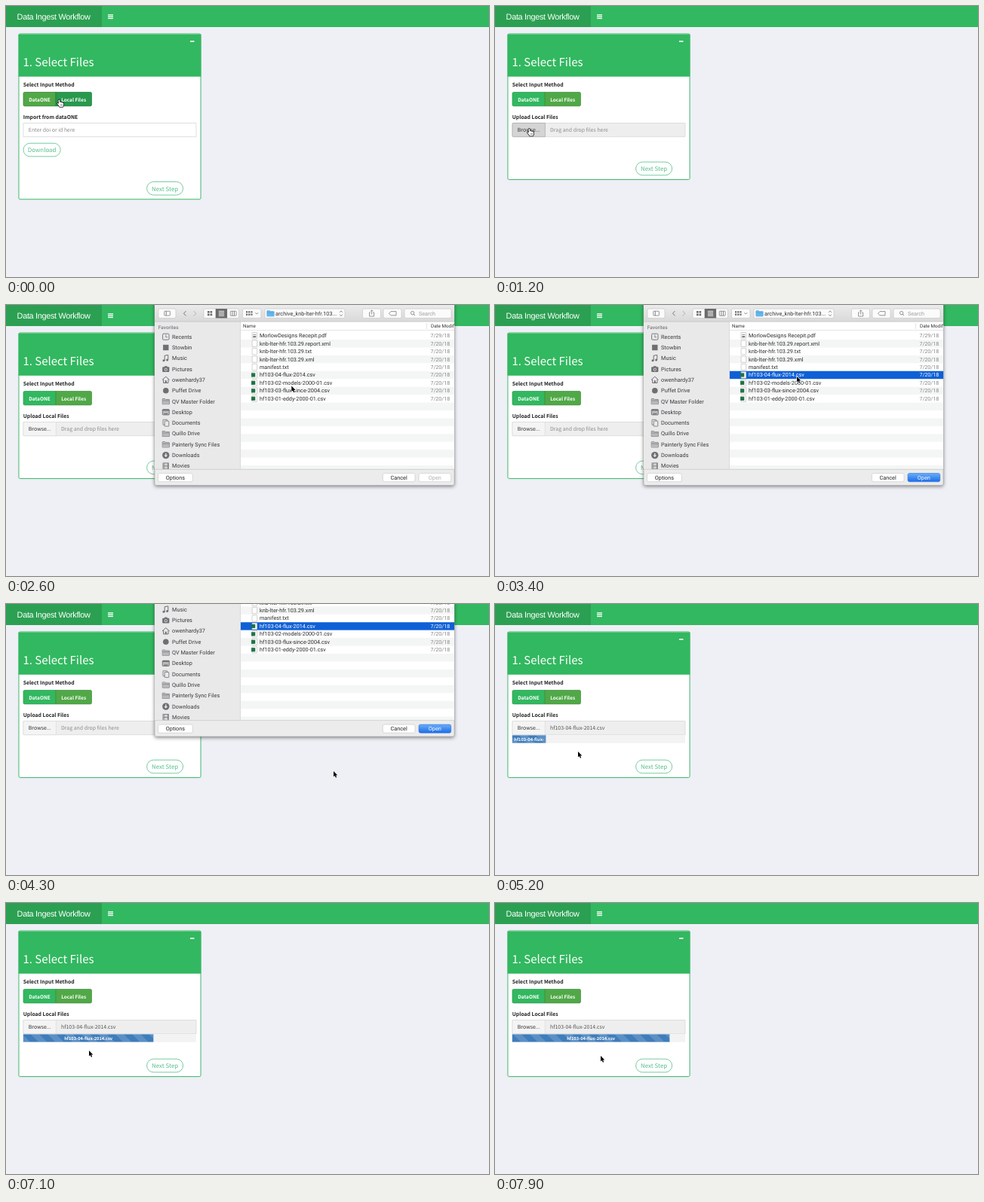
Animation, 640 px wide and 360 px high, one loop 8 s. Source, as an HTML page with a canvas:

```html
<!DOCTYPE html>
<html lang="en">
<head>
<meta charset="utf-8">
<title>Data Ingest Workflow</title>
<style>
html, body { margin: 0; width: 100%; height: 100%; overflow: hidden; background: #eef0f5; }
canvas { display: block; width: 640px; height: 360px; }
</style>
</head>
<body>
<canvas id="stage"></canvas>
<script>
const LOOP = 8000, STEP = 100;
const WEB = '"Noto Sans CJK JP", "Noto Sans CJK SC", "Noto Sans CJK", "Open Sans", sans-serif';
const MAC = 'Roboto, Inter, sans-serif';
const GREEN = '#32b860', TEAL = '#55bf8b';
const FILE = 'hf103-04-flux-2014.csv';

const SIDEBAR = ['Recents', 'Stowbin', 'Music', 'Pictures', 'owenhardy37', 'Puffet Drive',
  'QV Master Folder', 'Desktop', 'Documents', 'Quillo Drive', 'Painterly Sync Files',
  'Downloads', 'Movies'];
const ICONS = ['clock', 'square', 'note', 'camera', 'home', 'circle', 'folder', 'desk', 'pages',
  'folder', 'folder', 'down', 'film'];
const FILES = ['MorlowDesigns Recepit.pdf', 'knb-lter-hfr.103.29.report.xml',
  'knb-lter-hfr.103.29.txt', 'knb-lter-hfr.103.29.xml', 'manifest.txt', FILE,
  'hf103-02-models-2000-01.csv', 'hf103-03-flux-since-2004.csv', 'hf103-01-eddy-2000-01.csv'];

// [time, x, y] of the pointer tip
const POINTER = [[0, 70, 124.5], [300, 88, 122], [700, 88, 122], [1200, 45, 163], [1500, 45, 163],
  [1800, 331, 123], [2200, 368.5, 114.3], [2500, 374, 110], [3100, 400, 95], [3500, 400, 95],
  [4000, 568, 226], [4100, 568, 226], [4300, 434, 222], [4800, 110, 196], [7500, 110, 196],
  [7900, 140, 203]];
const PROGRESS = [[4700, 0], [5200, 45], [7100, 173], [7900, 209]];

const canvas = document.getElementById('stage');
const c = canvas.getContext('2d');
const dpr = window.devicePixelRatio || 1;
canvas.width = 640 * dpr;
canvas.height = 360 * dpr;

const smooth = p => { p = Math.min(1, Math.max(0, p)); return p * p * (3 - 2 * p); };

function along(keys, t, i = 1) {
  if (t <= keys[0][0]) return keys[0][i];
  for (let k = 1; k < keys.length; k++) {
    const a = keys[k - 1], b = keys[k];
    if (t <= b[0]) return a[i] + (b[i] - a[i]) * (t - a[0]) / (b[0] - a[0]);
  }
  return keys[keys.length - 1][i];
}

function rect(x, y, w, h, fill) {
  c.fillStyle = fill;
  c.fillRect(x, y, w, h);
}

function round(x, y, w, h, r, fill, stroke, lw = 0.7) {
  c.beginPath();
  c.roundRect(x, y, w, h, r);
  if (fill) { c.fillStyle = fill; c.fill(); }
  if (stroke) { c.strokeStyle = stroke; c.lineWidth = lw; c.stroke(); }
}

function line(pts, color, lw = 0.8) {
  c.beginPath();
  pts.forEach(([x, y], i) => i ? c.lineTo(x, y) : c.moveTo(x, y));
  c.strokeStyle = color;
  c.lineWidth = lw;
  c.stroke();
}

function shape(pts, fill, stroke, lw) {
  c.beginPath();
  pts.forEach(([x, y]) => c.lineTo(x, y));
  c.closePath();
  if (stroke) { c.strokeStyle = stroke; c.lineWidth = lw; c.stroke(); }
  c.fillStyle = fill;
  c.fill();
}

function disc(x, y, r, fill) {
  c.beginPath();
  c.arc(x, y, r, 0, 7);
  c.fillStyle = fill;
  c.fill();
}

function text(s, x, y, size, color, font = WEB, weight = 400, align = 'left') {
  c.font = `${weight} ${size}px ${font}`;
  c.textAlign = align;
  c.fillStyle = color;
  c.fillText(s, x, y);
}

function pill(label, x, y, w) {
  round(x, y, w, 17.6, 8.8, '#fff', TEAL, 0.8);
  text(label, x + w / 2, y + 12, 7.9, TEAL, WEB, 500, 'center');
}

function page(t) {
  const local = t >= 500;
  rect(0, 0, 640, 360, '#eef0f5');
  rect(0, 0, 640, 28, GREEN);
  rect(0, 0, 127, 28, '#2ba052');
  c.letterSpacing = '-0.32px';
  text('Data Ingest Workflow', 14.6, 18, 10.9, '#fff', '"Liberation Sans", Arial, sans-serif');
  c.letterSpacing = '0px';
  for (let i = 0; i < 3; i++) rect(135, 11.2 + i * 2.3, 7, 1.3, '#fff');

  const bottom = local ? 231 : 257.2;
  c.shadowColor = 'rgba(0,0,0,.15)';
  c.shadowBlur = 2 * dpr;
  round(17, 37, 241, bottom - 37, 1.8, '#fff');
  c.shadowBlur = 0;
  c.shadowColor = 'transparent';
  round(17, 37, 241, bottom - 37.5, 1.8, null, GREEN, 0.9);
  rect(16.6, 37.5, 241.8, 56.3, GREEN);
  rect(244, 46.2, 5.5, 1.6, '#fff');
  text('1. Select Files', 22.4, 79.6, 15, '#fff', WEB, 500);

  text('Select Input Method', 22.7, 107.4, 6.85, '#222', WEB, 700);
  round(23, 114.5, 43, 18.4, [1.7, 0, 0, 1.7], local ? GREEN : '#51a847', local ? '#2a9c50' : '#2f7d3a');
  round(66, 114.5, 47.5, 18.4, [0, 1.7, 1.7, 0], local ? '#51a847' : '#28994d', local ? '#3f9140' : '#1f7f40');
  text('DataONE', 44.5, 126.5, 6.5, '#fff', WEB, 700, 'center');
  text('Local Files', 89.6, 126.5, 6.45, '#fff', WEB, 700, 'center');

  if (local) upload(t); else {
    text('Import from dataONE', 22.7, 149.8, 6.85, '#222', WEB, 700);
    round(23, 155.5, 229, 18.2, 0, '#fff', '#ccd0d8');
    text('Enter doi or id here', 29.8, 167.4, 6.95, '#8c8c8c');
    pill('Download', 23, 182.3, 49.2);
  }
  pill('Next Step', 186.6, local ? 207.2 : 233.5, 48);
}

function upload(t) {
  const hover = t >= 1100 && t < 2500, chosen = t >= 4600;
  text('Upload Local Files', 22.7, 149.8, 6.85, '#222', WEB, 700);
  round(23, 155.5, 229, 18.2, 0, '#eee', '#d2d4da');
  round(23, 155.5, 43.4, 18.2, [1.7, 0, 0, 1.7], hover ? '#d4d4d4' : '#f4f4f4', hover ? '#a6a6a6' : '#dcdcdc');
  text('Browse...', 44.7, 167.4, 6.95, '#333', WEB, 400, 'center');
  text(chosen ? FILE : 'Drag and drop files here', 73, 167.4, 6.95, chosen ? '#555' : '#8c8c8c');
  if (chosen) bar(t);
}

function bar(t) {
  const x = 22.6, y = 174.2, h = 10.6, w = along(PROGRESS, t), tile = 22.4;
  rect(x, y, 229.4, h, '#f3f3f3');
  if (w <= 0) return;
  c.save();
  c.beginPath();
  c.rect(x, y, w, h);
  c.clip();
  rect(x, y, w, h, '#3f7dbb');
  const shift = tile * (1 - t % 2000 / 2000);
  for (let s = x + shift - 2 * tile; s < x + w; s += tile) {
    shape([[s, y], [s + tile / 2, y], [s + tile / 2 + h, y + h], [s + h, y + h]], 'rgba(255,255,255,.15)');
  }
  // the label wraps at its hyphens and only the first line shows
  c.font = `700 5.7px ${WEB}`;
  const label = [22, 14, 9, 6].map(n => FILE.slice(0, n))
    .find(s => c.measureText(s).width <= w) || 'hf103-';
  text(label, x + w / 2, y + 7.5, 5.7, '#fff', WEB, 700, 'center');
  c.restore();
}

function folder(x, y, fill, edge) {
  shape([[x - 4.5, y - 3.4], [x - 1, y - 3.4], [x, y - 2.4], [x + 4.5, y - 2.4], [x + 4.5, y + 3.6],
    [x - 4.5, y + 3.6]], fill, edge, 1);
  line([[x - 4.5, y - 1], [x + 4.5, y - 1]], edge, 0.6);
}

function icon(kind, x, y) {
  const g = '#6f6f72';
  if (kind === 'clock') {
    round(x - 4.2, y - 4, 8.4, 8, 1.2, null, g, 0.9);
    line([[x, y - 2.5], [x, y + 0.5], [x + 2.2, y + 0.5]], g);
  } else if (kind === 'square') rect(x - 3.7, y - 3.7, 7.4, 7.4, g);
  else if (kind === 'circle') disc(x, y, 3.8, g);
  else if (kind === 'note') {
    line([[x - 1.6, y + 3], [x - 1.6, y - 3.6], [x + 3, y - 4.4], [x + 3, y + 2]], g, 1);
    disc(x - 2.8, y + 3, 1.5, g);
    disc(x + 1.8, y + 2.2, 1.5, g);
  } else if (kind === 'camera') {
    round(x - 4.6, y - 2.8, 9.2, 6.6, 1, g);
    rect(x - 1.8, y - 4, 3.6, 1.5, g);
    disc(x, y + 0.6, 2, '#e9e9ea');
    disc(x, y + 0.6, 1.2, g);
  } else if (kind === 'home') {
    line([[x - 4.8, y], [x, y - 4.2], [x + 4.8, y]], g, 1);
    line([[x - 3.2, y - 0.8], [x - 3.2, y + 4], [x + 3.2, y + 4], [x + 3.2, y - 0.8]], g, 1);
    rect(x - 1, y + 0.8, 2, 3.2, g);
  } else if (kind === 'folder') folder(x, y, '#b9b9bc', g);
  else if (kind === 'desk') {
    round(x - 4.5, y - 3.6, 9, 7.2, 0.8, '#b9b9bc', g, 0.9);
    rect(x - 4.5, y - 3.6, 9, 1.7, g);
    rect(x - 2.5, y + 1.6, 5, 1.2, g);
  } else if (kind === 'pages') {
    round(x - 3.8, y - 4.4, 5.6, 7, 0.4, '#e9e9ea', g, 0.8);
    round(x - 1.6, y - 2.6, 5.6, 7, 0.4, '#e9e9ea', g, 0.8);
  } else if (kind === 'down') {
    disc(x, y, 4.7, g);
    rect(x - 0.7, y - 2.7, 1.4, 3, '#e9e9ea');
    shape([[x - 2.4, y], [x + 2.4, y], [x, y + 2.7]], '#e9e9ea');
  } else {
    round(x - 4.2, y - 4.4, 8.4, 8.8, 0.6, g);
    rect(x - 2.3, y - 3.6, 4.6, 3.2, '#d2d2d4');
    rect(x - 2.3, y + 0.4, 4.6, 3.2, '#d2d2d4');
    for (let i = 0; i < 4; i++) {
      rect(x - 3.8, y - 3.6 + i * 2, 0.8, 1.1, '#e9e9ea');
      rect(x + 3, y - 3.6 + i * 2, 0.8, 1.1, '#e9e9ea');
    }
  }
}

function toolbar() {
  const g = '#6a6a6a', edge = '#c2c2c2';
  const grad = c.createLinearGradient(0, 0, 0, 22);
  grad.addColorStop(0, '#ebebeb');
  grad.addColorStop(1, '#d9d9d9');
  rect(197, -6, 397, 28, grad);
  [[202, 23], [262, 46.5], [313.5, 24.5], [343, 106], [472.5, 24], [500, 24], [528, 62]]
    .forEach(([x, w]) => round(x, 5, w, 12.4, 2, '#fbfbfb', edge, 0.6));

  round(209.8, 8.2, 7.6, 5.8, 0.6, null, g);
  line([[212.3, 8.2], [212.3, 14]], g);
  line([[238.5, 8], [235.5, 11.2], [238.5, 14.4]], '#777', 1);
  line([[248.8, 8], [251.8, 11.2], [248.8, 14.4]], '#b0b0b0', 1);

  rect(277.7, 5, 15.4, 12.4, '#6b6b6b');
  for (let i = 0; i < 4; i++) rect(267 + i % 2 * 3.6, 8 + (i >> 1) * 3.6, 2.6, 2.6, g);
  for (let i = 0; i < 4; i++) rect(281.8, 7.8 + i * 2, 7.4, 0.9, '#fff');
  round(297.3, 8.2, 7.8, 6, 0.4, null, g);
  line([[299.9, 8.2], [299.9, 14.2]], g);
  line([[302.5, 8.2], [302.5, 14.2]], g);

  for (let i = 0; i < 6; i++) rect(318 + i % 3 * 3.2, 8.2 + (i / 3 | 0) * 3.4, 2.2, 2.2, g);
  line([[330.5, 10.2], [332.3, 12], [334.1, 10.2]], g);

  folder(350.5, 11.2, '#63b6ec', '#4a9fd8');
  text('archive_knb-lter-hfr.103...', 357, 13.8, 7.28, '#333', MAC);
  line([[442.2, 9.8], [444, 7.8], [445.8, 9.8]], g);
  line([[442.2, 12.6], [444, 14.6], [445.8, 12.6]], g);

  line([[483, 10], [481.6, 10], [481.6, 15], [487.6, 15], [487.6, 10], [486.2, 10]], g, 0.7);
  line([[484.6, 12.4], [484.6, 7]], g, 0.7);
  line([[483, 8.4], [484.6, 6.8], [486.2, 8.4]], g, 0.7);
  c.beginPath();
  [[507.5, 11.2], [510, 8.6], [517, 8.6], [517, 13.8], [510, 13.8]].forEach(p => c.lineTo(...p));
  c.closePath();
  c.stroke();

  c.beginPath();
  c.arc(538.6, 10.6, 2.2, 0, 7);
  c.stroke();
  line([[540.2, 12.2], [542, 14]], g);
  text('Search', 547, 13.8, 7.2, '#a0a0a0', MAC);
}

function button(label, x, w, on) {
  let fill = '#fff';
  if (on) {
    fill = c.createLinearGradient(0, 223.5, 0, 235);
    fill.addColorStop(0, '#6aaef7');
    fill.addColorStop(1, '#1b6be8');
  }
  round(x, 223.6, w, 11.2, 2.2, fill, on ? '#2a71dd' : '#c4c4c4', 0.6);
  const color = on ? '#fff' : label === 'Open' ? '#b0b0b0' : '#222';
  text(label, x + w / 2, 231.9, 7.3, color, MAC, 400, 'center');
}

function fileIcon(name, x, y) {
  round(x - 3.2, y - 4.2, 6.6, 8.4, 0.4, '#fff', '#b4b4b4', 0.6);
  if (name.endsWith('csv')) rect(x - 4.2, y - 2.6, 5.2, 5.2, '#217346');
  else if (name.endsWith('pdf')) {
    rect(x - 2, y - 1.6, 4, 0.9, '#8a8a8a');
    rect(x - 2, y + 0.6, 4, 1.8, '#666');
  }
}

function dialog(t) {
  const shown = t < 4000 ? smooth((t - 2000) / 375) : 1 - smooth((t - 4175) / 375);
  if (shown <= 0) return;
  const picked = t >= 3200;
  c.save();
  c.translate(0, -245 * (1 - shown));
  c.shadowColor = 'rgba(0,0,0,.5)';
  c.shadowBlur = 5 * dpr;
  c.shadowOffsetY = 1.5 * dpr;
  round(197, -20, 397, 259.5, 2.5, '#ececec');
  c.shadowColor = 'transparent';
  c.shadowBlur = c.shadowOffsetY = 0;
  round(197, -20, 397, 259.5, 2.5, null, '#a9a9ab', 0.6);

  rect(197, 22, 113.5, 196, '#e9e9ea');
  rect(310.5, 22, 283.5, 196, '#fff');
  rect(310.2, 22, 0.7, 196, '#cfcfcf');
  toolbar();
  rect(197, 21.7, 397, 0.7, '#bdbdbd');

  c.save();
  c.beginPath();
  c.rect(197, 22, 397, 196);
  c.clip();
  text('Favorites', 201.8, 32.4, 6.5, '#7c7c80', MAC, 500);
  SIDEBAR.forEach((name, i) => {
    const y = 42.2 + i * 14.31;
    icon(ICONS[i], 211.8, y);
    text(name, 220, y + 2.5, 7.35, '#3a3a3c', MAC);
  });

  text('Name', 314, 29.9, 6.3, '#333', MAC);
  text('Date Modified', 563, 29.9, 6.3, '#333', MAC);
  rect(557, 24, 0.6, 8, '#d0d0d0');
  rect(311, 33.3, 283, 0.6, '#d4d4d4');
  for (let i = 0; i < 18; i++) {
    const y = 40.7 + i * 10.45, name = FILES[i], on = picked && i === 5;
    if (on) rect(311, y - 5.2, 283, 10.45, '#0f60d6');
    else if (i % 2) rect(311, y - 5.2, 283, 10.45, '#f4f5f5');
    if (!name) continue;
    fileIcon(name, 329.3, y);
    text(name, 336, y + 2.5, 7.25, on ? '#fff' : '#2c2c2c', MAC);
    text(i ? '7/20/18' : '7/29/18', 562.5, y + 2.5, 7.05, on ? '#fff' : '#858585', MAC);
  }
  c.restore();

  rect(197, 217.9, 397, 0.7, '#c6c6c6');
  button('Options', 201.5, 45.8);
  button('Cancel', 499.3, 42.7);
  button('Open', 547, 42.7, picked);
  c.restore();
}

function pointer(t) {
  c.save();
  c.translate(along(POINTER, t, 1), along(POINTER, t, 2));
  c.lineJoin = 'round';
  if (t < 2400) {
    shape([[-0.6, 0.4], [0.5, 0], [1.2, 0.6], [1.4, 3.4], [2.6, 3.1], [3.2, 3.7], [4.4, 3.5], [5, 4.2],
      [5.9, 4.2], [6.3, 5], [6.2, 7], [5.3, 9.4], [1, 9.4], [-0.4, 7.2], [-2, 5.4], [-1.8, 4.6],
      [-0.9, 4.7], [0, 5.6]], '#fff', '#111', 1.5);
    [2, 3.4, 4.7].forEach(x => line([[x, 6], [x, 8]], '#444', 0.5));
  } else {
    shape([[0, 0], [0, 7.6], [1.7, 6], [2.9, 8.8], [4.2, 8.3], [3, 5.5], [5.3, 5.5]], '#000', '#fff', 1.3);
  }
  c.restore();
}

function draw() {
  const t = Math.floor(performance.now() % LOOP / STEP) * STEP;
  c.setTransform(dpr, 0, 0, dpr, 0, 0);
  c.textRendering = 'geometricPrecision';
  page(t);
  dialog(t);
  pointer(t);
  requestAnimationFrame(draw);
}
draw();
</script>
</body>
</html>
```
